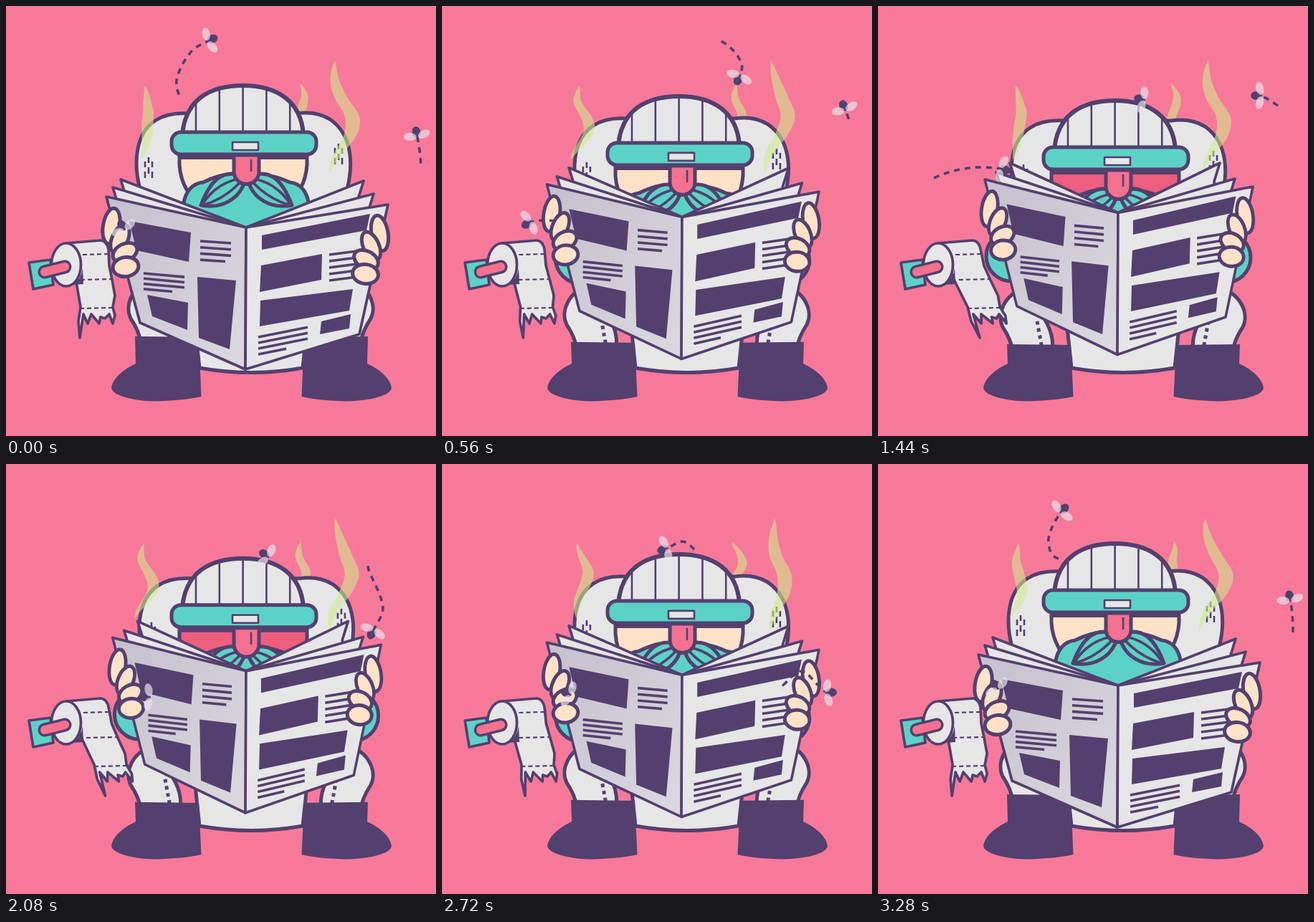
Recreate the animation shown at these times as an HTML page. Size 600 by 600 pixels, loop 3.36 s.

```html
<!DOCTYPE html>
<html lang="en">
<head>
<meta charset="utf-8">
<title>Morning paper</title>
<style>
html, body { margin: 0; width: 100%; height: 100%; overflow: hidden; background: #f7799a; }
svg { display: block; width: 100%; height: 100%; }
.o { stroke: #53406e; stroke-width: 5; stroke-linejoin: round; stroke-linecap: round; }
.thin { stroke-width: 3.7; }
.g { fill: #e6e6e6; }
.t { fill: #5cd2c6; }
.s { fill: #fee2c8; }
.k { fill: #f4718f; }
.p { fill: #53406e; }
.n { fill: none; }
.line { fill: none; stroke: #53406e; stroke-width: 3.6; }
.fine { stroke-width: 2.6; }
.smoke { fill: #d2eb8c; fill-opacity: .57; }
.wing { fill: #e9e4ec; fill-opacity: .68; }
</style>
</head>
<body>
<svg viewBox="0 0 600 600">
  <defs>
    <linearGradient id="shade" x2="1" y2="1">
      <stop stop-color="#c5c0cd"/><stop offset="1" stop-color="#dbd9df"/>
    </linearGradient>
    <path id="dome" d="M246 180C250 130 285 111 331 111S412 132 415 180Z"/>
    <clipPath id="inDome"><use href="#dome"/></clipPath>
    <g id="leg">
      <path class="o g" d="M205 394C176 402 165 430 174 448Q186 466 188 482H243C246 462 238 440 222 425Z"/>
      <path class="line" style="stroke-width:5;stroke-dasharray:5" d="M222 440Q225 456 229 478"/>
    </g>
    <g id="hand" class="o s"></g>
    <g id="fly">
      <ellipse class="p" cx="2" rx="8" ry="6"/>
      <ellipse id="wing" class="wing" cx="-5" cy="-9" rx="5.5" ry="9" transform="rotate(14)"/>
      <use href="#wing" transform="scale(1 -1)"/>
    </g>
  </defs>

  <path id="smokeMid" class="smoke"/>
  <g id="tank">
    <path class="o g" d="M192 270C176 228 178 180 208 160Q226 148 255 150H405Q432 146 452 158C484 180 488 225 470 275L440 320H220Z"/>
    <path id="marks" class="line fine"/>
  </g>
  <path id="smokeLeft" class="smoke"/>
  <path id="smokeRight" class="smoke"/>

  <path class="o g" d="M262 430L270 505Q342 518 414 505L422 430Z"/>
  <circle id="armL" class="o t" r="35"/>
  <circle id="armR" class="o t" r="35"/>
  <g id="legs">
    <use href="#leg"/><use href="#leg" transform="matrix(-1 0 0 1 683 0)"/>
  </g>
  <path id="boot" class="p"/>
  <use href="#boot" transform="matrix(-1 0 0 1 685 0)"/>

  <path id="sheet" class="o g thin"/>
  <path id="tears" class="line" style="stroke-width:2.2;stroke-dasharray:6 4"/>
  <path class="o t thin" d="M32 358L62 354L66 389L38 395Z"/>
  <path class="p" d="M92 389Q105 382 107 366L108 388Z"/>
  <ellipse class="o g thin" cx="84" cy="361" rx="20.5" ry="30"/>
  <path id="spindle" class="o n" style="stroke-width:19" d="M54 371L82 364"/>
  <path class="n" stroke="#f4718f" stroke-width="12" stroke-linecap="round" d="M54 371L82 364"/>

  <g id="head">
    <path id="face" class="o" d="M242 205V222Q244 250 262 270H400Q418 250 420 222V205Z"/>
    <path class="o t" d="M247 320V290C246 265 256 248 275 246Q304 232 320 236H352Q370 234 396 246C415 248 424 265 423 290V320Z"/>
    <g id="whisker" class="o t">
      <path d="M327 236C300 228 284 246 272 278C302 284 326 268 333 245Z"/>
      <path class="n thin" d="M274 277Q292 248 325 241M275 278Q308 268 329 243"/>
    </g>
    <use href="#whisker" transform="matrix(-1 0 0 1 671 0)"/>
    <path class="p" d="M240 204H422V214H240Z"/>
    <path class="o k" d="M318 208V231A17.5 17.5 0 0 0 353 231V208Z"/>
    <path class="line fine" d="M342 214V231"/>
    <use href="#dome" class="o g" style="stroke-width:6"/>
    <path id="stripes" class="line fine" clip-path="url(#inDome)"/>
    <rect class="o t" x="231" y="176" width="202" height="31" rx="13"/>
    <rect class="o g fine" x="316" y="190" width="36" height="11"/>
  </g>

  <g id="fans" class="o g thin"></g>
  <g id="pageL">
    <path class="o thin" fill="url(#shade)" d="M140 266L335 309L334 507L187 442Z"/>
    <path class="p" d="M172 300L258 316L255 357L182 341ZM197 403L254 414L253 452L204 433ZM267 378L321 383L312 479L269 463Z"/>
    <path id="textL" class="line"/>
  </g>
  <g id="pageR">
    <path class="o g thin" d="M533 277L335 309L334 507L493 458Z"/>
    <path class="p" d="M357 320L508 290L503 313L357 340ZM356 362L441 346L440 382L354 399ZM355 411L484 395L479 425L354 447ZM440 440L481 430L479 450L438 458Z"/>
    <path id="textR" class="line"/>
  </g>
  <g id="handL"><use href="#hand"/></g>
  <g id="handR"><use href="#hand" transform="matrix(-1 0 0 1 668.5 10)"/></g>
  <g id="flies"></g>
</svg>
<script>
const LOOP = 3360, STEP = 80, TAIL = 320;
const $ = id => document.getElementById(id);
const set = (id, name, value) => $(id).setAttribute(name, value);
const clamp = v => Math.max(0, Math.min(1, v));
const mix = (a, b, k) => a + (b - a) * k;
const join = points => points.map(q => q.map(v => v.toFixed(1)).join(" ")).join("L");
const repeat = (n, make) => Array.from({ length: n }, (_, i) => make(i)).join("");

const finger = (x, y, rx, ry, turn) =>
  `<ellipse rx="${rx}" ry="${ry}" transform="translate(${x} ${y}) rotate(${turn})"/>`;
$("hand").innerHTML = finger(147, 307, 11.5, 25, 10) + finger(159, 325, 11, 21, 24)
  + finger(166, 344, 18, 12, -28) + finger(167, 364, 18, 13.5, -8);

const column = (x, y, width, slope, count, gap, last) => repeat(count, i => {
  const w = i < count - 1 ? width : last;
  return `M${x} ${y + i * gap}l${w} ${w * slope}`;
});
set("textL", "d", column(271, 328, 43, .07, 4, 8.7, 35) + column(192, 373, 57, .09, 4, 7.3, 40));
set("textR", "d", column(451, 347, 37, -.13, 5, 9, 37) + column(352, 462, 69, -.2, 4, 8, 39));
set("stripes", "d", repeat(5, i => `M${265 + 32.8 * i} 100v80`));
const marks = (x, y) => repeat(3, i => `M${x + 5 * i} ${y - i % 2 * 6}v8m0 6v9`);
set("marks", "d", marks(194, 217) + marks(459, 198));

// Flight keys: time, x, y
const headFly = [[0,286,47],[120,335,28],[240,390,49],[400,417,78],[560,414,101],[880,393,133],
  [1440,367,130],[2080,362,127],[2400,352,119],[2560,335,108],[2720,310,119],[2960,252,132],
  [3140,238,104],[3280,258,64]];
const sideFly = [[0,573,178],[560,561,141],[1120,558,139],[1440,530,125],[1760,505,142],
  [1960,526,200],[2080,511,235],[2400,476,307],[2560,503,289],[2720,541,319],[2840,572,285],[2960,579,235]];
const paperFly = [[0,163,308],[240,158,300],[560,120,303],[720,105,325],[880,70,330],[1000,34,295],
  [1120,78,240],[1440,175,228],[1600,200,265],[1760,199,318],[2080,196,325],[2720,175,320]];
const flights = [headFly, sideFly, paperFly];
$("flies").innerHTML = repeat(3, i =>
  `<path id="trail${i}" class="line" style="stroke-dasharray:8 7"/><use id="fly${i}" href="#fly"/>`);

function locate(keys, time) {
  const t = (time % LOOP + LOOP) % LOOP, n = keys.length;
  const at = j => {
    const [kt, x, y] = keys[(j + n) % n];
    return [kt + Math.floor(j / n) * LOOP, x, y];
  };
  let i = n - 1;
  while (keys[i][0] > t) i--;
  const [a, b, c, d] = [at(i - 1), at(i), at(i + 1), at(i + 2)];
  const span = c[0] - b[0], u = (t - b[0]) / span;
  return [1, 2].map(k => {
    const m0 = (c[k] - a[k]) / (c[0] - a[0]) * span, m1 = (d[k] - b[k]) / (d[0] - b[0]) * span;
    const rise = c[k] - b[k];
    return b[k] + u * m0 + u * u * (3 * rise - 2 * m0 - m1) + u * u * u * (m0 + m1 - 2 * rise);
  });
}

function drawFly(keys, i, t) {
  const path = [];
  for (let back = TAIL; back >= 0; back -= 16) path.push(locate(keys, t - back));
  const length = path.slice(1).reduce((sum, q, j) => sum + Math.hypot(q[0] - path[j][0], q[1] - path[j][1]), 0);
  set("trail" + i, "d", length > 18 ? "M" + join(path) : "");
  const [x, y] = locate(keys, t), [x0, y0] = locate(keys, t - 30), [x1, y1] = locate(keys, t + 30);
  const angle = Math.atan2(y1 - y0, x1 - x0) * 180 / Math.PI;
  set("fly" + i, "transform", `translate(${x} ${y}) rotate(${angle})`);
}

// Smooth start with a long soft finish
function ease(x) {
  let lo = 0, hi = 1;
  for (let i = 0; i < 24; i++) {
    const s = (lo + hi) / 2, r = 1 - s;
    if (.51 * r * r * s + .54 * r * s * s + s * s * s < x) lo = s; else hi = s;
  }
  return lo * lo * (3 - 2 * lo);
}

// A ribbon around a bent spine, with a wave travelling up it
function smoke(id, spine, top, height, half, phase, waves) {
  const left = [], right = [], last = spine.length - 1;
  for (let j = 0; j <= 30; j++) {
    const u = j / 30, q = u * last, i = Math.min(last - 1, Math.floor(q)), f = q - i;
    const a = spine[Math.max(0, i - 1)], b = spine[i], c = spine[i + 1], d = spine[Math.min(last, i + 2)];
    const base = b + .5 * f * (c - a + f * (2 * a - 5 * b + 4 * c - d + f * (3 * (b - c) + d - a)));
    const x = base + 4.5 * Math.cos(2 * Math.PI * (phase + waves * u));
    const w = half * Math.pow(Math.sin(Math.PI * u), .75);
    left.push([x - w, top + height * u]);
    right.unshift([x + w, top + height * u]);
  }
  set(id, "d", "M" + join(left.concat(right)) + "Z");
}

function drawRoll(s) {
  const sway = ([x, y]) => [x + s * 41 * Math.pow(Math.max(0, y - 335) / 128, 1.5), y];
  const edge = [[143, 340], [144, 362], [148, 382], [152, 404], [149, 420], [152, 432], [149, 443], [144, 430],
    [138, 436], [132, 434], [130, 443], [119, 430], [114, 443], [108, 430], [103, 463], [101, 440], [104, 420], [98, 385]];
  set("sheet", "d", `M84 331L132 327Q141 328 ${join(edge.map(sway))}Z`);
  const tear = (x, y, w) => "M" + join([[x, y], [x + w, y - 1]].map(sway));
  set("tears", "d", tear(107, 347, 35) + tear(104, 382, 44) + tear(103, 422, 46));
}

function drawFans(p) {
  const sheet = (x0, y0, x1, y1, edge) => {
    const x = mix(x0, x1, p), y = mix(y0, y1, p);
    return `<path d="M${x} ${y}L335 ${309 - 20.5 * p}L${edge} ${322 - 20 * p}L${x + (edge < 335 ? 8 : -8)} ${y + 26}Z"/>`;
  };
  $("fans").innerHTML = sheet(160, 242, 184, 219, 200) + sheet(149, 253, 165, 232, 190)
    + sheet(499, 244, 477, 219, 475) + sheet(513, 262, 498, 241, 485);
}

function draw(t) {
  const near = Math.max(0, Math.min(t, LOOP - STEP - t));
  const p = ease(clamp(near / 1440));
  const flush = clamp((near - 900) / 260);

  set("tank", "transform", `translate(${4 * p} ${10 * p})`);
  set("head", "transform", `translate(0 ${21 * p})`);
  set("legs", "transform", `translate(0 ${12 * p - 12})`);
  set("face", "fill", `rgb(${mix(254, 238, flush)},${mix(226, 94, flush)},${mix(200, 126, flush)})`);

  const page = (squeeze, tilt) =>
    `matrix(${1 - squeeze * p} ${tilt * p} 0 1 ${335 * squeeze * p} ${-(20.5 + 335 * tilt) * p})`;
  for (const part of ["page", "hand"]) {
    set(part + "L", "transform", page(.046, .018));
    set(part + "R", "transform", page(.05, -.0225));
  }
  drawFans(p);

  const armX = mix(212, 186, p), armY = mix(360, 349, p);
  set("armL", "transform", `translate(${armX} ${armY})`);
  set("armR", "transform", `translate(${671 - armX} ${armY + 2})`);

  const cuff = 461 + 11 * p;
  set("boot", "d", `M180 ${cuff}L181 499C164 507 149 519 147 533C149 546 188 552 213 551.5Q252 550 272.5 545L269 ${cuff + 1}Z`);

  drawRoll(Math.sin(Math.PI * t / LOOP) ** 2);

  const phase = t / 1520;
  smoke("smokeLeft", [191, 193, 201, 201, 192, 184], 111, 104, 8, phase - 1.16, 1.26);
  smoke("smokeMid", [409, 413, 416, 411, 404], 108, 76, 6.5, phase - 1.21, 1.26);
  smoke("smokeRight", [461, 463, 470, 481, 476, 461, 453], 76, 156, 10, phase - 1.68, 1);

  flights.forEach((keys, i) => drawFly(keys, i, t));
}

function tick() {
  draw(Math.floor(performance.now() % LOOP / STEP) * STEP);
  requestAnimationFrame(tick);
}
tick();
</script>
</body>
</html>
```
